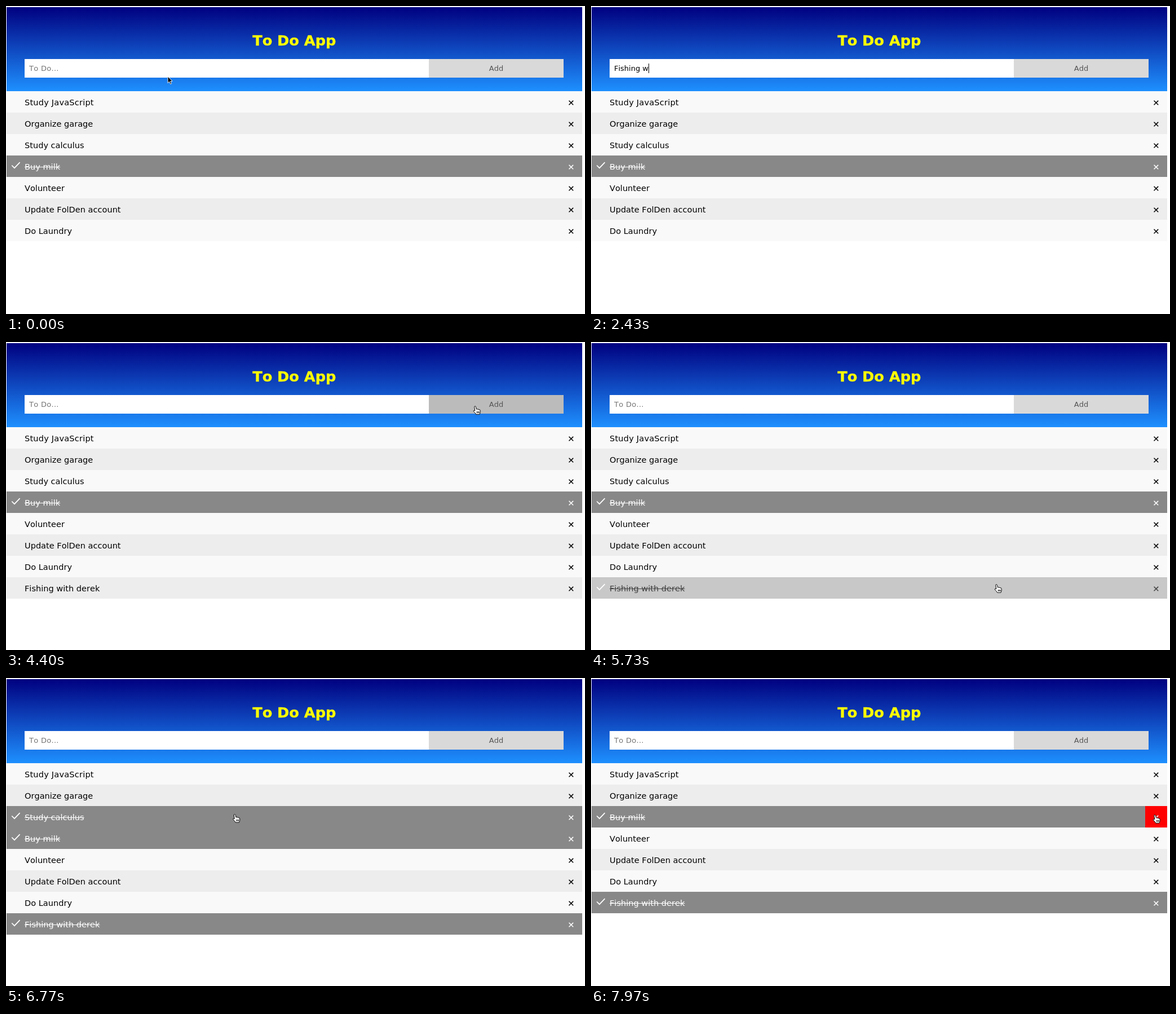
An HTML page that plays this animation: 1027x546 px, repeating every 8000 ms.

```html
<!DOCTYPE html>
<html lang="en">
<head>
<meta charset="utf-8">
<title>To Do App</title>
<style>
  html, body { margin: 0; width: 100%; height: 100%; overflow: hidden; background: #fff; }
  body { position: relative; font: 14.56px "DejaVu Sans", Verdana, sans-serif; font-kerning: none; cursor: default; }
  header {
    position: absolute; left: 1px; top: 2px; width: 1020.5px; height: 149px;
    background: linear-gradient(navy, dodgerblue);
  }
  h1 {
    position: absolute; left: 0; top: 44px; width: 100%; margin: 0;
    font-size: 25.6px; line-height: 30px; text-align: center;
    color: #ff0; -webkit-text-stroke: .4px #ff0;
  }
  .field, .add {
    position: absolute; top: 92px; height: 33px; box-sizing: border-box;
    font-size: 13px; line-height: 34px; white-space: pre;
  }
  .field { left: 32px; width: 717px; padding-left: 8px; background: #fff; }
  .add { left: 749px; width: 239px; text-align: center; color: #555; }
  .hint { color: #757575; letter-spacing: .3px; }
  .caret {
    display: inline-block; width: 1px; height: 17px; margin-right: -1px;
    vertical-align: -4px; background: #000;
  }
  ul { position: absolute; left: 1px; top: 151px; width: 1020.5px; margin: 0; padding: 0; list-style: none; }
  li { position: relative; height: 38px; line-height: 40px; padding-left: 32px; white-space: pre; overflow: hidden; }
  li:first-child { letter-spacing: .2px; }
  .done .label { text-decoration: line-through; text-decoration-thickness: 1px; }
  .tick { position: absolute; left: 8px; top: 10px; width: 17px; height: 16px; display: none; }
  .done .tick { display: block; }
  .tick path { fill: none; stroke: #fff; stroke-width: 1.7; }
  .close {
    position: absolute; right: 0; top: 0; width: 38.5px; height: 38px;
    letter-spacing: 0; text-align: center; -webkit-text-stroke: .3px;
  }
  .close.hot { background: red; color: #fff; }
  #pointer { position: absolute; left: 0; top: 0; width: 20px; height: 22px; overflow: visible; }
  #pointer path { display: none; stroke-linejoin: round; }
</style>
</head>
<body>
<header>
  <h1>To Do App</h1>
  <div class="field"><span class="typed"></span><span class="caret"></span><span class="hint">To Do...</span></div>
  <div class="add">Add</div>
</header>
<ul></ul>
<svg id="pointer">
  <path id="arrow" d="M0 0V11.5L2.7 9 4.7 13.4 6.6 12.6 4.7 8.3H8.2Z" fill="#000" stroke="#fff" stroke-width=".9"/>
  <path id="beam" d="M-2.5-7Q0-7 0-5Q0-7 2.5-7M0-5V6M-2.5 8Q0 8 0 6Q0 8 2.5 8M-1.5 2H1.5" fill="none" stroke="#000"/>
  <path id="hand" d="M-1.2 8L-2.2 1.2Q-2.1-.3-.8-.2Q.2 0 .6 1.4L1.5 5.2Q2.6 4.2 3.7 5.4Q5 4.6 6 6Q8 5.5 8.2 7.6Q8.6 11 7 14.2H.7Q-.8 11.6-3.2 9.4Q-4.4 8-3.2 7.3Q-2.2 7-1.2 8ZM2.4 9V12M4.3 9V12M6.1 9V12" fill="#fff" stroke="#000"/>
</svg>
<script>
const LOOP = 8000, FADE = 200, SAMPLES = 20;
const TOP = 151, ROW = 38;
const NEW_TASK = "Fishing with derek";
const FOCUS = 800, TYPE_START = 1500, KEY_GAP = 115, ADD = 4230, REMOVE = 7800;
const REMOVED = 2, ADDED = 7;

// Index of a task -> time it gets ticked off
const doneAt = { 2: 6480, 3: -LOOP, 7: 5683 };
const tasks = ["Study JavaScript", "Organize garage", "Study calculus", "Buy milk",
  "Volunteer", "Update FolDen account", "Do Laundry", NEW_TASK];

// Pointer tip: time, x, y
const route = [
  [0, 287, 125], [60, 287, 125], [400, 300, 112], [3600, 300, 112],
  [4150, 833, 114], [4500, 833, 114], [5000, 740, 300], [5350, 720, 430],
  [5900, 720, 430], [6080, 600, 385], [6115, 470, 262], [6250, 291, 244],
  [6550, 291, 244], [6950, 500, 240], [7330, 916, 237], [7600, 1001, 242], [8000, 1001, 243]
];

const $ = s => document.querySelector(s);
const gray = v => `rgb(${v},${v},${v})`;
const list = $("ul");

const rows = tasks.map(text => {
  const li = document.createElement("li");
  li.innerHTML = `<svg class="tick"><path d="M1.3 7.5L6 12.2L15.6 2.2"/></svg>` +
    `<span class="label">${text}</span><span class="close">×</span>`;
  list.append(li);
  return li;
});

function tip(t) {
  const i = Math.max(1, route.findIndex(p => p[0] >= t));
  const [t0, x0, y0] = route[i - 1], [t1, x1, y1] = route[i];
  const k = (t - t0) / (t1 - t0);
  return { x: x0 + (x1 - x0) * k, y: y0 + (y1 - y0) * k };
}

const present = (i, t) => i === ADDED ? t >= ADD : i !== REMOVED || t < REMOVE;
const isDone = (i, t) => t >= (doneAt[i] ?? Infinity);
const overAdd = p => p.x >= 750 && p.x < 989 && p.y >= 94 && p.y < 127;
const overField = p => p.x >= 33 && p.x < 750 && p.y >= 94 && p.y < 125;

function hoveredRow(t) {
  const slot = Math.floor((tip(t).y - TOP) / ROW);
  const shown = tasks.map((_, i) => i).filter(i => present(i, t));
  return shown[slot] ?? -1;
}

// Mean of a value over the last FADE ms gives the transition
function fade(value, t) {
  let sum = 0;
  for (let k = 0; k < SAMPLES; k++) sum += value(Math.max(0, t - FADE * k / SAMPLES));
  return sum / SAMPLES;
}

function rowShade(i, t) {
  if (isDone(i, t)) return 136;
  if (hoveredRow(t) === i) return 221;
  return i % 2 ? 237 : 249;
}

function drawRows(t, p) {
  const hovered = hoveredRow(t);
  rows.forEach((li, i) => {
    li.style.display = present(i, t) ? "" : "none";
    li.classList.toggle("done", isDone(i, t));
    li.style.background = gray(fade(s => rowShade(i, s), t));
    li.style.color = gray(fade(s => isDone(i, s) ? 255 : 0, t));
    li.lastChild.classList.toggle("hot", hovered === i && p.x >= 983);
  });
}

function drawField(t) {
  const keys = Math.floor((t - TYPE_START) / KEY_GAP) + 1;
  const typed = t < ADD ? NEW_TASK.slice(0, Math.max(0, keys)) : "";
  const typing = keys > 0 && keys <= NEW_TASK.length;
  const blink = Math.floor((t - FOCUS) / 500) % 2 === 0;
  const focused = t >= FOCUS && t < ADD;
  $(".typed").textContent = typed;
  $(".hint").style.display = typed ? "none" : "";
  $(".caret").style.visibility = focused && (typing || blink) ? "visible" : "hidden";
}

function drawPointer(t, p) {
  const hidden = t >= TYPE_START && t < 3600;
  const kind = overField(p) ? "beam" : overAdd(p) || p.y >= TOP ? "hand" : "arrow";
  for (const id of ["arrow", "beam", "hand"])
    $("#" + id).style.display = !hidden && id === kind ? "inline" : "none";
  $("#pointer").style.transform = `translate(${p.x}px, ${p.y}px)`;
}

function draw(now) {
  const t = now % LOOP, p = tip(t);
  drawRows(t, p);
  drawField(t);
  drawPointer(t, p);
  $(".add").style.background = gray(fade(s => overAdd(tip(s)) ? 187 : 217, t));
}

const start = performance.now();
function tick() {
  draw(performance.now() - start);
  requestAnimationFrame(tick);
}
tick();
</script>
</body>
</html>
```
